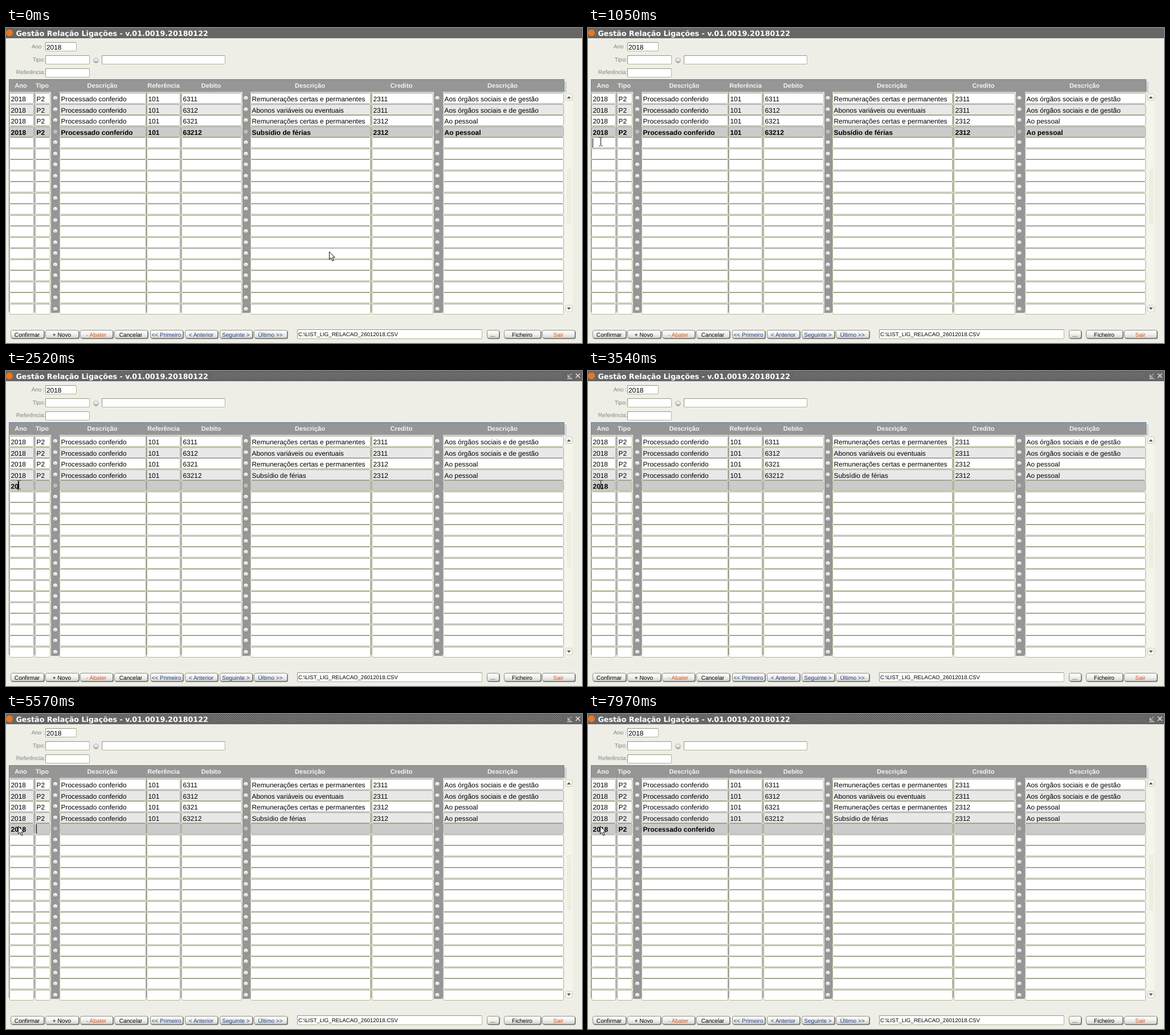
Animation of 1011x554 px, one loop 8000 ms. Source, as an HTML page:

```html
<!DOCTYPE html>
<html lang="pt">
<head>
<meta charset="utf-8">
<title>Gestão Relação Ligações</title>
<style>
html, body { margin: 0; width: 100%; height: 100%; overflow: hidden; background: #efeee6; }
svg { display: block; width: 1011px; height: 554px; }
text { font: 11.9px "Liberation Sans", Arial, sans-serif; text-rendering: geometricPrecision; white-space: pre; }
.title { font: bold 12.73px "DejaVu Sans", Verdana, sans-serif; fill: #fff; }
.label { font-size: 10px; fill: #7b8880; text-anchor: end; }
.head { font-size: 11.1px; font-weight: bold; fill: #f4f4f4; text-anchor: middle; }
.btn { font-size: 10.1px; text-anchor: middle; }
.path { font-size: 9.6px; }
.cell { fill: #fff; stroke: #b4b592; }
.alt .cell { fill: #e8e8e8; }
.on .cell { fill: #cbcbcb; }
.on text { font-size: 12px; font-weight: bold; }
.on .knob { fill: #bdbdbd; }
.knob { fill: url(#ball); stroke: #808080; stroke-width: .7; }
</style>
</head>
<body>
<svg id="stage" viewBox="0 0 1011 554" xmlns="http://www.w3.org/2000/svg"></svg>
<script>
const LOOP = 8000, ROWS = 20, PITCH = 19.5;
const GREY = '#969696', NAVY = '#1f3f82', ORANGE = '#d9541a';
// left and right edge of each table column, and the three knob bars
const cols = [[6, 49], [51, 78], [94, 246], [247, 306], [308, 414], [429, 640], [642, 750], [767, 979]];
const bars = [[79, 93], [415, 428], [751, 766]];
const knobs = [86.5, 421, 757];
const heads = [['Ano', 26], ['Tipo', 63.5], ['Descrição', 169], ['Referência', 276.5], ['Debito', 360],
  ['Descrição', 533.5], ['Credito', 694], ['Descrição', 871.5]];
const entry = (debit, name, credit, who) => ['2018', 'P2', 'Processado conferido', '101', debit, name, credit, who];
const data = [
  entry('6311', 'Remunerações certas e permanentes', '2311', 'Aos órgãos sociais e de gestão'),
  entry('6312', 'Abonos variáveis ou eventuais', '2311', 'Aos órgãos sociais e de gestão'),
  entry('6321', 'Remunerações certas e permanentes', '2312', 'Ao pessoal'),
  entry('63212', 'Subsídio de férias', '2312', 'Ao pessoal')
];
const buttons = [['Confirmar', 8, 67, '#000'], ['+ Novo', 69, 128, '#000'], ['- Abater', 130, 188, ORANGE],
  ['Cancelar', 190, 249, '#000'], ['<< Primeiro', 253, 311, NAVY], ['< Anterior', 314, 372, NAVY],
  ['Seguinte >', 375, 433, NAVY], ['Último >>', 435, 494, NAVY], ['...', 844, 866, '#000'],
  ['Ficheiro', 874, 939, '#000'], ['Sair', 941, 999, ORANGE]];

const rect = (x, y, w, h, attrs = '') => `<rect x="${x}" y="${y}" width="${w}" height="${h}" ${attrs}/>`;
const text = (s, x, y, attrs = '') =>
  `<text x="${x}" y="${y}" ${attrs}>${s.replace(/</g, '&lt;').replace(/>/g, '&gt;')}</text>`;
const line = (d, color, width = 1) => `<path d="${d}" fill="none" stroke="${color}" stroke-width="${width}"/>`;
const knob = (x, y) => `<circle class="knob" cx="${x}" cy="${y}" r="4.2"/>`;

const field = (x, y, r, b) =>
  rect(x + .5, y + .5, r - x - 1, b - y - 1, 'rx="1.5" fill="#fff" stroke="#b4b592"') +
  line(`M${x + .5} ${b - 1}V${y + .5}H${r - 1}`, '#95958a');

function button([label, x, r, color]) {
  return rect(x + 1, 532, r - x, 15, 'rx="3.5" fill="#77776f"') +
    rect(x + .5, 531.5, r - x - 1, 14, 'rx="3" fill="url(#face)" stroke="#8d8d88"') +
    text(label, (x + r - 1) / 2, 543, `class="btn" fill="${color}"`);
}

function row(i) {
  const top = Math.round(114.49 + i * PITCH), values = data[i] || [];
  let out = `<g class="row${i === 1 || i === 3 ? ' alt' : ''}">`;
  cols.forEach(([x, r], c) => {
    out += rect(x + .5, top + .5, r - x - 1, 18, 'rx="2" class="cell"') +
      line(`M${x + 2} ${top + .5}H${r - 2}`, '#96968a') +
      text(values[c] || '', x + 2.5, top + 15);
  });
  return out + knobs.map(x => knob(x, top + 9.4)).join('') + '</g>';
}

function scrollbar() {
  const end = (y, tri) => rect(982.5, y, 11.5, 12, 'rx="2" fill="#f8f8f0" stroke="#c9c8b8"') +
    `<path d="${tri}" fill="#555"/>`;
  return rect(981, 114, 14, 388, 'fill="#f5f5ec"') +
    end(115.5, 'M984.5 124h7l-3.5-4z') + end(487.5, 'M984.5 491.5h7l-3.5 4z') +
    rect(985, 248, 8, 98, 'fill="url(#grip)"');
}

const defs = `<defs>
  <linearGradient id="face" x2="0" y2="1"><stop stop-color="#fff"/><stop offset=".5" stop-color="#f1f1ee"/><stop offset="1" stop-color="#d0d0cc"/></linearGradient>
  <linearGradient id="ball" x2="0" y2="1"><stop offset=".2" stop-color="#f6f6f6"/><stop offset=".65" stop-color="#d8d8d8"/><stop offset="1" stop-color="#8c8c8c"/></linearGradient>
  <pattern id="bumps" x="364" y="4" width="4" height="4" patternUnits="userSpaceOnUse">
    <path d="M0 0h1v1h-1zM2 2h1v1h-1z" fill="#a8a8a8"/><path d="M1 1h1v1h-1zM3 3h1v1h-1z" fill="#3c3c3c"/></pattern>
  <pattern id="grip" x="985" y="248" width="4" height="4" patternUnits="userSpaceOnUse">
    <path d="M0 2h1v1h-1zM2 0h1v1h-1z" fill="#c4bb8c"/></pattern></defs>`;

const stage = document.getElementById('stage');
stage.innerHTML = defs +
  rect(0, 0, 1011, 554, 'fill="#efeee6"') +
  rect(0, 0, 1011, 18, 'fill="#666"') +
  '<circle cx="6" cy="8.5" r="6" fill="#e87722"/>' +
  text('Gestão Relação Ligações - v.01.0019.20180122', 17.4, 13.5, 'class="title"') +
  '<g id="deco">' + rect(364, 4, 614, 10, 'fill="url(#bumps)"') +
    line('M993 4.5L987 10.5M986.5 6V11H991.5M985 13.5H994', '#eee') +
    line('M1000 4.5L1007.5 12M1007.5 4.5L1000 12', '#eee', 1.2) + '</g>' +
  text('Ano :', 68, 36, 'class="label"') + text('Tipo:', 68.5, 59, 'class="label"') +
  text('Referência:', 69, 81, 'class="label"') +
  field(69, 25, 124, 41) + text('2018', 71, 37.5) +
  field(69, 48, 147, 64) + knob(158, 57) + field(168, 48, 385, 64) + field(69, 71, 147, 87) +
  scrollbar() +
  rect(980, 94, 4, 20, 'fill="#d3d3d0"') +
  rect(5, 90, 975, 22.5, `fill="${GREY}"`) + line('M5.5 112V90.5H979.5V112', '#5f86a8') +
  heads.map(([s, x]) => text(s, x, 105, 'class="head"')).join('') +
  bars.map(([x, r]) => rect(x, 112, r - x, 389, `fill="${GREY}"`)).join('') +
  [5.5, 50, 93.5, 246.5, 307, 428.5, 641, 766.5].map(x => line(`M${x} 112V499`, GREY, 1.3)).join('') +
  Array.from({ length: ROWS }, (_, i) => row(i)).join('') +
  rect(430, 386, 210, 2, 'id="edge" fill="#b6b6c0"') +
  buttons.map(button).join('') +
  field(511, 530, 836, 547) + text('C:\\LIST_LIG_RELACAO_26012018.CSV', 513, 542, 'class="path"') +
  rect(0, 194, 1, 16, 'id="caret"') +
  '<g id="beam">' + line('M-3 -7.5H-1M1 -7.5H3M0 -7V7M-3 7.5H-1M1 7.5H3', '#111') + '</g>' +
  '<path id="arrow" d="M.5 .5V14L3.6 11.2L6 16.7L8.2 15.7L5.9 10.3H10.2Z" fill="#fff" stroke="#111"/>';

const [deco, edge, caret, beam, arrow] = ['deco', 'edge', 'caret', 'beam', 'arrow'].map(id => document.getElementById(id));
const rows = [...stage.querySelectorAll('.row')];
const fresh = rows[4].querySelectorAll('text');

// each list holds [start time, values...]
const moves = [[70, 535, 374], [140, 420, 308], [210, 270, 238], [280, 130, 196], [360, 42, 184], [440, 10, 200],
  [510, 11, 200], [570, 14, 200], [630, 17, 200], [690, 20, 200], [750, 22, 200]];
const carets = [[0, -9], [980, 8], [1590, -9], [2140, 15], [2520, 21], [2770, 27], [2990, 34], [3540, -9],
  [4170, 34], [4320, 53], [4950, -9], [5570, 53], [5800, 61], [6120, 68], [6730, -9], [7440, 249], [7970, -9]];
const years = [[0, 0], [2140, 1], [2520, 2], [2770, 3], [2990, 4]];
const kinds = [[0, 0], [5800, 1], [6120, 2]];

const at = (list, t) => list.reduce((hit, item) => item[0] <= t ? item : hit, list[0]);
const show = (el, on) => { el.style.visibility = on ? 'visible' : 'hidden'; };
const place = (el, x, y) => el.setAttribute('transform', `translate(${x} ${y})`);

function draw(now) {
  const t = now % LOOP, entered = t >= 1130, pointing = t < 70 || t >= 4320;
  const [, beamX, beamY] = at(moves, t);
  show(deco, entered);
  show(edge, t < 70);
  rows[3].classList.toggle('on', !entered);
  rows[4].classList.toggle('on', entered);
  fresh[0].textContent = '2018'.slice(0, at(years, t)[1]);
  fresh[1].textContent = 'P2'.slice(0, at(kinds, t)[1]);
  fresh[2].textContent = t >= 6730 ? 'Processado conferido' : '';
  caret.setAttribute('x', at(carets, t)[1]);
  show(arrow, pointing);
  show(beam, !pointing);
  place(arrow, ...(t < 70 ? [567, 393] : [21, 197]));
  place(beam, beamX + .5, beamY);
}

function tick() {
  draw(performance.now());
  requestAnimationFrame(tick);
}
tick();
</script>
</body>
</html>
```
